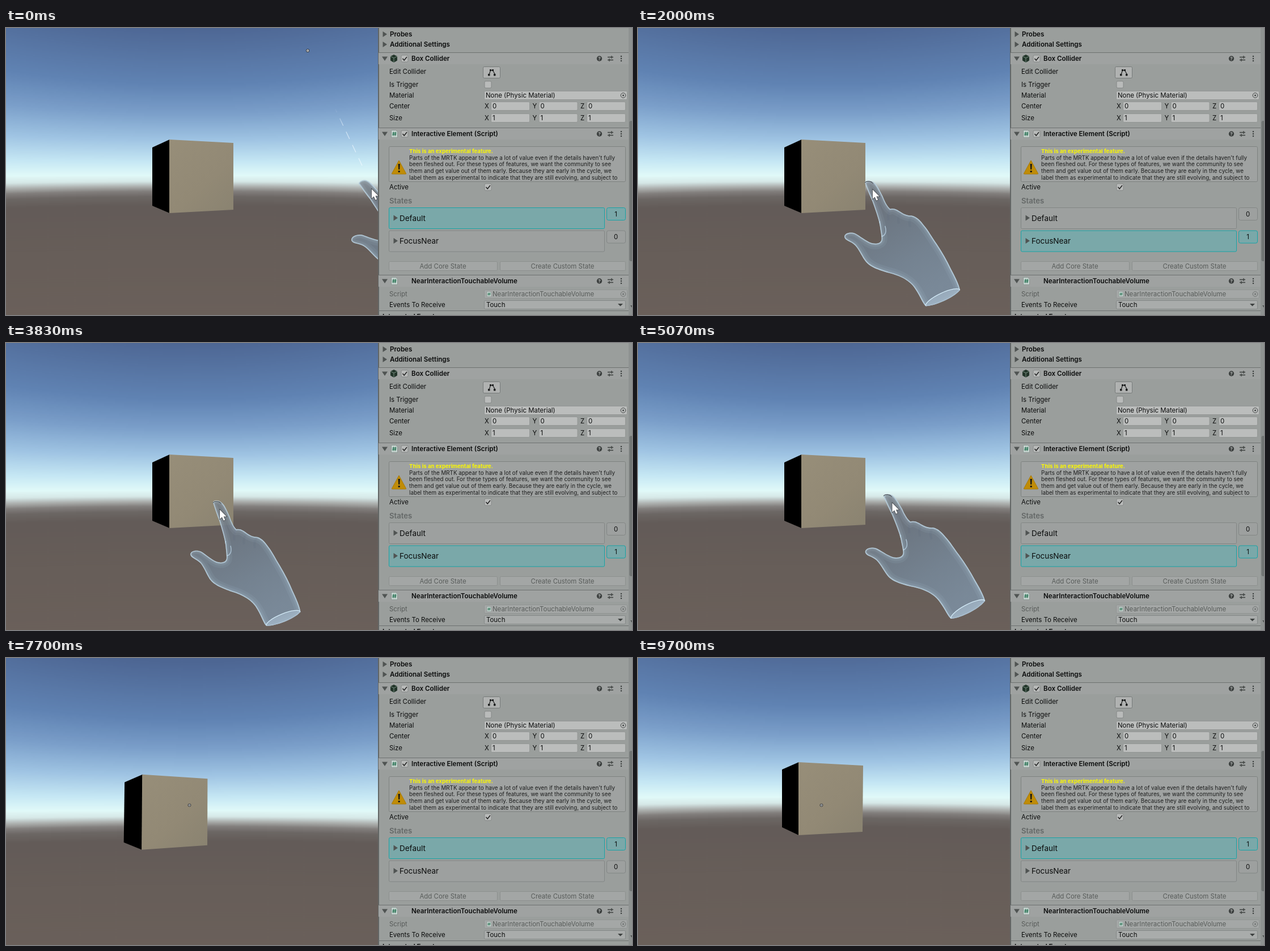
Write an HTML page with a canvas that moves like this. It is 1104 px wide and 507 px high and loops after 9.78 s.

```html
<!DOCTYPE html>
<html lang="en">
<head>
<meta charset="utf-8">
<title>Near focus state</title>
<style>
html, body { margin: 0; width: 1104px; height: 507px; overflow: hidden; background: #9a9e9c; }
svg, canvas { position: absolute; left: 0; top: 0; display: block; }
text { font: 11.45px Inter, sans-serif; fill: #0b0c0c; white-space: pre; }
text.b { font-size: 11.6px; font-weight: 600; }
text.dim { fill: #585c5a; }
text.mid { text-anchor: middle; }
text.note { font-size: 9.82px; fill: #1c1d1d; }
text.warn { font-size: 9.65px; font-weight: 700; fill: #fbf800; }
text.big { font-size: 13.5px; }
text.head { font-size: 13.1px; font-weight: 600; fill: #646867; }
.state rect { fill: #9da09f; stroke: #828685; }
.state.on rect { fill: #7aa8a9; stroke: #17a3a6; }
</style>
</head>
<body>
<svg id="panel" width="1104" height="507" viewBox="0 0 1104 507"></svg>
<canvas id="view" width="1104" height="507"></canvas>
<script>
const LOOP = 9780, VIEW_W = 656, VIEW_H = 507;

// ---------- inspector panel ----------
const rect = (x, y, w, h, fill, stroke = 'none', r = 2) =>
  `<rect x="${x}" y="${y}" width="${w}" height="${h}" rx="${r}" fill="${fill}" stroke="${stroke}"/>`;
const text = (x, cy, s, cls = '') => `<text x="${x}" y="${cy + 4.2}" class="${cls}">${s}</text>`;
const path = (d, fill, stroke = 'none', w = 1) =>
  `<path d="${d}" fill="${fill}" stroke="${stroke}" stroke-width="${w}"/>`;
const rule = y => rect(657, y, 441, 1, '#6d7170', 'none', 0);
const closed = (x, y) => path(`M${x - 3.5} ${y - 5}l7.5 5l-7.5 5z`, '#505453');
const open = (x, y) => path(`M${x - 5} ${y - 3.5}h10l-5 7.5z`, '#505453');
const field = (x, cy, w, s) =>
  rect(x + .5, cy - 7.5, w, 15, '#bbbdbc', '#939695') + text(x + 3, cy, s);

function check(x, y, on) {
  return rect(x - 6, y - 6, 12, 12, '#b9bbba', '#858887') +
    (on ? path(`M${x - 3.5} ${y}l2.7 3l4.8-6`, 'none', '#222', 1.5) : '');
}

function scriptIcon(x, y, s = 1) {
  return `<g transform="translate(${x} ${y}) scale(${s})">` +
    path('M-5.5-6.5h8l3 3v10h-11z', '#c3d0cc', '#7e8a86', .7) +
    path('M-1.2-3.5l-1 7M2.2-3.5l-1 7M-3.5-1.4h7M-3.8 1.4h7', 'none', '#22704f', 1.1) + '</g>';
}

function cubeIcon(x, y) {
  return path(`M${x} ${y - 7}l6 3v7.5l-6 3.5l-6-3.5v-7.5z`, '#22352a') +
    path(`M${x - 6} ${y - 4}l6 3l6-3M${x} ${y - 1}v8`, 'none', '#7b9284', 1);
}

function header(cy, title, icon, checked) {
  return rule(cy - 11) + rect(657, cy - 10, 441, 20, '#9fa2a1', 'none', 0) +
    open(668, cy) + icon + (checked ? check(703, cy, true) : '') + text(715, cy, title, 'b') +
    `<circle cx="1046.500" cy="${cy}" r="4.700" fill="#3c403f"/>` +
    `<text x="1046.5" y="${cy + 3}" class="mid" style="font-size:8px;font-weight:700;fill:#b5b8b7">?</text>` +
    path(`M1061 ${cy - 2.5}h10M1061 ${cy + 2.5}h10M1068 ${cy - 5}v5M1064 ${cy}v5`, 'none', '#3c403f', 1.3) +
    [-4, 0, 4].map(d => `<circle cx="1085" cy="${cy + d}" r="1.250" fill="#3c403f"/>`).join('');
}

const vector = (cy, v) => ['X', 'Y', 'Z'].map((axis, i) =>
  text(844 + 84.5 * i, cy, axis) + field(855 + 84.5 * i, cy, 68, v)).join('');

const picker = (cy, c) => `<circle cx="1088.500" cy="${cy}" r="4.300" fill="none" stroke="${c}"/>` +
  `<circle cx="1088.500" cy="${cy}" r="1.500" fill="${c}"/>`;

const stateRow = (id, y, name) => `<g id="${id}" class="state">` +
  rect(675.5, y + .5, 380, 37, '', '', 2) + rect(1059.5, y + .5, 33, 22, '', '', 3) +
  closed(687, y + 18.5) + text(694, y + 19.6, name, 'big') +
  `<text class="mid" x="1075.500" y="${y + 15.8}">0</text></g>`;

const button = (x, w, s) => rect(x + .5, 412.5, w, 16, '#a3a6a5', '#8c908e') +
  text(x + w / 2, 420.8, s, 'mid dim');

const notes = [
  'Parts of the MRTK appear to have a lot of value even if the details haven\'t fully',
  'been fleshed out. For these types of features, we want the community to see',
  'them and get value out of them early. Because they are early in the cycle, we',
  'label them as experimental to indicate that they are still evolving, and subject to'
];

const panel = document.getElementById('panel');
panel.innerHTML =
  rect(656, 0, 448, 507, '#9a9e9c', 'none', 0) + rect(656, 0, 2, 507, '#626665', 'none', 0) +
  closed(668, 11) + text(677, 11, 'Probes', 'b') +
  closed(668, 29) + text(677, 29, 'Additional Settings', 'b') +
  header(54, 'Box Collider', cubeIcon(684, 54), true) +
  text(676, 77, 'Edit Collider') + rect(841.5, 68.5, 30, 20, '#b0b2b1', '#767a79') +
  path('M852 82l2.500-7h4l4 7', 'none', '#1c1e1e', 1.2) +
  path('M850 81h3.500v3.500h-3.500zM853 73h3v3h-3zM857 73h3v3h-3zM860 81h3.500v3.500h-3.500z', '#1c1e1e') +
  text(676, 100, 'Is Trigger') + check(850, 100, false) +
  text(676, 119, 'Material') + field(843, 119, 252, 'None (Physic Material)') + picker(119, '#3e4241') +
  text(676, 138, 'Center') + vector(138, 0) +
  text(676, 159, 'Size') + vector(159, 1) +
  header(187, 'Interactive Element (Script)', scriptIcon(685, 187), true) +
  rect(675.5, 209.5, 417, 62, '#9fa2a1', '#7e8280') +
  path('M693 234l12.500 23q.5 1-1 1h-23q-1.500 0-1-1z', '#c08c07', '#a87a08') +
  path('M691.500 240h3.400l-.7 10h-2zM691.700 252h3v3h-3z', '#1d1b14') +
  text(711, 217, 'This is an experimental feature.', 'warn') +
  notes.map((s, i) => text(711, 228.6 + 11.6 * i, s, 'note')).join('') +
  text(676, 281, 'Active') + check(850, 281, true) +
  text(676, 305.3, 'States', 'head') +
  stateRow('rest', 317, 'Default') + stateRow('near', 357.5, 'FocusNear') +
  button(675, 191, 'Add Core State') + button(871, 221, 'Create Custom State') +
  header(447, 'NearInteractionTouchableVolume', scriptIcon(685, 447), false) +
  text(676, 470, 'Script', 'dim') + rect(843.5, 462.5, 252, 15, '#a4a7a6', '#919594') +
  scriptIcon(852, 470, .7) + text(858, 470, 'NearInteractionTouchableVolume', 'dim') + picker(470, '#6d7170') +
  text(676, 489, 'Events To Receive') + rect(843.5, 481.5, 249, 15, '#a9acab', '#858988') +
  text(847, 489, 'Touch') + path('M1079 487h9l-4.500 4.500z', '#3c403f') +
  rule(499) + text(664, 510, 'Integrated Events', 'b') +
  rect(1098, 0, 6, 507, '#8e9291', 'none', 0) + rect(1099.5, 164, 6, 248, '#717574', 'none', 3) +
  path('M1101 490h6l-3 4z', '#505453');

const rows = ['rest', 'near'].map(id => document.getElementById(id));

function setFocus(near) {
  rows.forEach((row, i) => {
    const on = near === (i === 1);
    row.classList.toggle('on', on);
    row.lastElementChild.textContent = on ? 1 : 0;
  });
}

// ---------- motion ----------
// Smooth monotone interpolation through [time, value] keys.
function track(keys, t) {
  const n = keys.length - 1;
  if (t <= keys[0][0]) return keys[0][1];
  if (t >= keys[n][0]) return keys[n][1];
  const slope = i => i < 0 || i >= n ? 0 : (keys[i + 1][1] - keys[i][1]) / (keys[i + 1][0] - keys[i][0]);
  const tangent = i => {
    const a = slope(i - 1), b = slope(i);
    return a * b <= 0 ? 0 : 2 * a * b / (a + b);
  };
  let i = 0;
  while (t > keys[i + 1][0]) i++;
  const d = keys[i + 1][0] - keys[i][0], u = (t - keys[i][0]) / d, v = 1 - u;
  return keys[i][1] * (1 + 2 * u) * v * v + tangent(i) * d * u * v * v +
    keys[i + 1][1] * u * u * (3 - 2 * u) - tangent(i + 1) * d * u * u * v;
}

const handX = [[80, 628], [1000, 333], [1700, 333], [2000, 407], [2350, 560], [2680, 634], [3100, 634],
  [3400, 588], [3680, 458], [3830, 372.5], [4150, 327], [4620, 327], [5070, 440], [5540, 628], [6200, 630]];
const handY = [[80, 270], [1000, 270], [1700, 270], [2000, 271], [2680, 268], [3400, 266], [3680, 268],
  [3830, 280], [4150, 268], [4620, 268], [5070, 268], [5540, 262]];
const mouseX = [[6200, 646], [6520, 624], [6640, 624], [7150, 390]];
const mouseY = [[6200, 276], [6520, 253], [6640, 253], [7150, 303]];
const camera = [[7280, 0], [8310, 1], [8390, 1], [9300, 1.94], [9700, 2]];
const HAND_GONE = 6200, DRAG = 7300, NEAR_X = 520;

// Cube corners: front face clockwise, then the left side's far edge; last is the horizon.
const poses = [
  [288, 197, 401, 203, 401, 321, 288, 327, 258, 314, 258, 211, 284],
  [157, 221, 276, 231, 275, 348, 154, 359, 120, 346, 124, 234, 309],
  [283, 184, 397, 190, 396, 307, 283, 313, 254, 299, 254, 197, 269]
];

// ---------- scene ----------
const ctx = document.getElementById('view').getContext('2d');
const SKY = 350, GROUND = 270;

const strip = document.createElement('canvas');
strip.width = 1;
strip.height = SKY + GROUND;
{
  const c = strip.getContext('2d'), g = c.createLinearGradient(0, 0, 0, strip.height);
  [[-350, '#475f8d'], [-284, '#4e6794'], [-184, '#6083b3'], [-134, '#7a9ec9'], [-86, '#9fc4e3'],
    [-48, '#c5e7f4'], [-24, '#e1faf9'], [-13, '#d6e8e7'], [-4, '#abaeac'], [4, '#83807e'],
    [14, '#6c6764'], [30, '#635b58'], [110, '#675e59'], [270, '#6c615b']
  ].forEach(([y, col]) => g.addColorStop((y + SKY) / strip.height, col));
  c.fillStyle = g;
  c.fillRect(0, 0, 1, strip.height);
}

function drawSky(horizon) {
  const w = 4;
  for (let x = 0; x < VIEW_W; x += w) {
    const u = (x + w / 2 - 328) / 328, h = horizon + 5 * u * u, tall = SKY * (1 + .16 * u * u);
    ctx.drawImage(strip, 0, SKY - 1, 1, GROUND + 1, x, h - 1, w, GROUND + 1);
    ctx.drawImage(strip, 0, 0, 1, SKY, x, h - tall, w, tall);
  }
}

function poly(points, fill) {
  ctx.beginPath();
  for (let i = 0; i < points.length; i += 2) ctx.lineTo(points[i], points[i + 1]);
  ctx.closePath();
  ctx.fillStyle = fill;
  ctx.fill();
}

function drawCube(p) {
  poly([p[0] + .5, p[1], p[6] + .5, p[7], p[8], p[9], p[10], p[11]], '#000');
  const g = ctx.createLinearGradient(p[0], p[1], p[4], p[5]);
  g.addColorStop(0, '#978e79');
  g.addColorStop(.6, '#928975');
  g.addColorStop(1, '#8a8371');
  poly(p.slice(0, 8), g);
}

// Hand outline, with the index fingertip at the origin.
const hand = new Path2D('M-7 3C-3 14 1 24 6 35C12 52 17 66 19 77C20 86 22 94 22 100C22 108 14 110 5 108' +
  'C-6 104-16 95-24 91C-32 88-43 90-43 97C-42 104-32 104-24 112C-17 120-14 128-8 137C0 150 18 155 34 160' +
  'C54 165 72 173 82 190C90 202 94 214 99 218C110 219 146 206 159 190C157 180 150 166 143 153' +
  'C136 138 128 124 118 109C110 98 104 86 96 77C90 69 84 62 75 60C68 60 62 58 56 54C50 50 44 46 37 48' +
  'C32 44 28 36 24 26C18 14 14 6 9 2C5-2-4-2-7 3Z');
const curl = new Path2D('M19 70C17 84 19 96 23 96C29 94 31 87 28 78');
const knuckles = new Path2D('M37 48C34 54 33 60 34 68M56 54C51 60 50 66 52 74M75 60C70 66 69 72 72 80');

function drawHand(x, y) {
  const d = x - 407;
  ctx.save();
  ctx.beginPath();
  ctx.rect(0, 0, VIEW_W, VIEW_H);
  ctx.clip();
  ctx.translate(x, y);
  ctx.rotate((-.08 * d + .00008 * d * d) * Math.PI / 180);
  const s = 1.01 + .0006 * d - .0000027 * d * d;
  ctx.scale(s, s);
  ctx.clip(hand);
  const g = ctx.createLinearGradient(0, 0, 110, 190);
  g.addColorStop(0, 'rgba(108,115,124,.8)');
  g.addColorStop(.35, 'rgba(110,122,135,.93)');
  g.addColorStop(.7, 'rgba(117,132,147,.96)');
  g.addColorStop(1, 'rgba(122,138,154,.97)');
  ctx.fillStyle = g;
  ctx.fill(hand);
  ctx.strokeStyle = 'rgba(84,100,118,.14)';
  ctx.lineWidth = 4;
  ctx.stroke(knuckles);
  ctx.strokeStyle = 'rgba(200,226,244,.65)';
  ctx.lineWidth = 1.5;
  ctx.stroke(curl);
  [[20, .06], [12, .07], [6, .14], [3, .65]].forEach(([w, a]) => {
    ctx.lineWidth = w;
    ctx.strokeStyle = `rgba(205,230,246,${a})`;
    ctx.stroke(hand);
  });
  ctx.beginPath();
  ctx.ellipse(129, 204, 33, 9, -.44, 0, 7);
  ctx.fillStyle = 'rgba(166,186,202,.7)';
  ctx.fill();
  ctx.lineWidth = 1.3;
  ctx.strokeStyle = '#d3eaf7';
  ctx.stroke();
  ctx.restore();
}

function drawRing(x, y) {
  ctx.lineWidth = 1.6;
  ctx.strokeStyle = '#42484d';
  ctx.beginPath();
  ctx.ellipse(x, y + 3, 7, 3.2, .1, Math.PI, 2 * Math.PI);
  ctx.stroke();
  ctx.lineWidth = 1;
  ctx.strokeStyle = 'rgba(225,240,248,.8)';
  ctx.beginPath();
  ctx.ellipse(x, y + 2, 7, 3.2, .1, Math.PI, 2 * Math.PI);
  ctx.stroke();
}

function drawDot(x, y, r = 2) {
  ctx.beginPath();
  ctx.arc(x, y, r + 1, 0, 7);
  ctx.fillStyle = '#34373a';
  ctx.fill();
  ctx.beginPath();
  ctx.arc(x, y, r, 0, 7);
  ctx.fillStyle = '#f5f5f5';
  ctx.fill();
  ctx.beginPath();
  ctx.arc(x, y, .9, 0, 7);
  ctx.fillStyle = '#25282a';
  ctx.fill();
}

function drawRay(x, y) {
  const dx = 476 + (x - NEAR_X) * .52, dy = 53 - (x - NEAR_X) * .12;
  const g = ctx.createLinearGradient(x, y - 27, dx, dy);
  g.addColorStop(0, 'rgba(240,250,255,.85)');
  g.addColorStop(.35, 'rgba(225,238,250,.7)');
  g.addColorStop(.5, 'rgba(215,230,245,0)');
  ctx.strokeStyle = g;
  ctx.lineWidth = 1.2;
  ctx.setLineDash([14, 12]);
  ctx.beginPath();
  ctx.moveTo(x, y - 27);
  ctx.lineTo(dx, dy);
  ctx.stroke();
  ctx.setLineDash([]);
  drawDot(dx, dy);
}

const arrow = new Path2D('M0 0V16.500L3.800 13L6.600 19.300L9.400 18L6.600 12H11.800Z');

function drawMouse(x, y) {
  ctx.save();
  ctx.translate(x, y);
  ctx.lineWidth = 1.4;
  ctx.strokeStyle = '#3a3d40';
  ctx.stroke(arrow);
  ctx.fillStyle = '#fff';
  ctx.fill(arrow);
  ctx.restore();
}

function draw(t) {
  ctx.clearRect(0, 0, 1104, VIEW_H);
  const c = track(camera, t), i = Math.min(1, Math.floor(c)), f = c - i;
  const pose = poses[i].map((v, k) => v + (poses[i + 1][k] - v) * f);
  drawSky(pose[12]);
  drawCube(pose);

  const x = track(handX, t), y = track(handY, t), near = x < NEAR_X;
  setFocus(near);
  if (t < HAND_GONE) {
    if (!near) drawRay(x, y);
    drawHand(x, y);
    if (near) drawRing(x, y);
    drawMouse(x + 6.5 + .047 * (x - 407), y + 14.5);
  } else {
    drawDot(323.5, 260, 1.8);
    if (t < DRAG) drawMouse(track(mouseX, t), track(mouseY, t));
  }
}

function tick() {
  draw(performance.now() % LOOP);
  requestAnimationFrame(tick);
}
tick();
</script>
</body>
</html>
```
